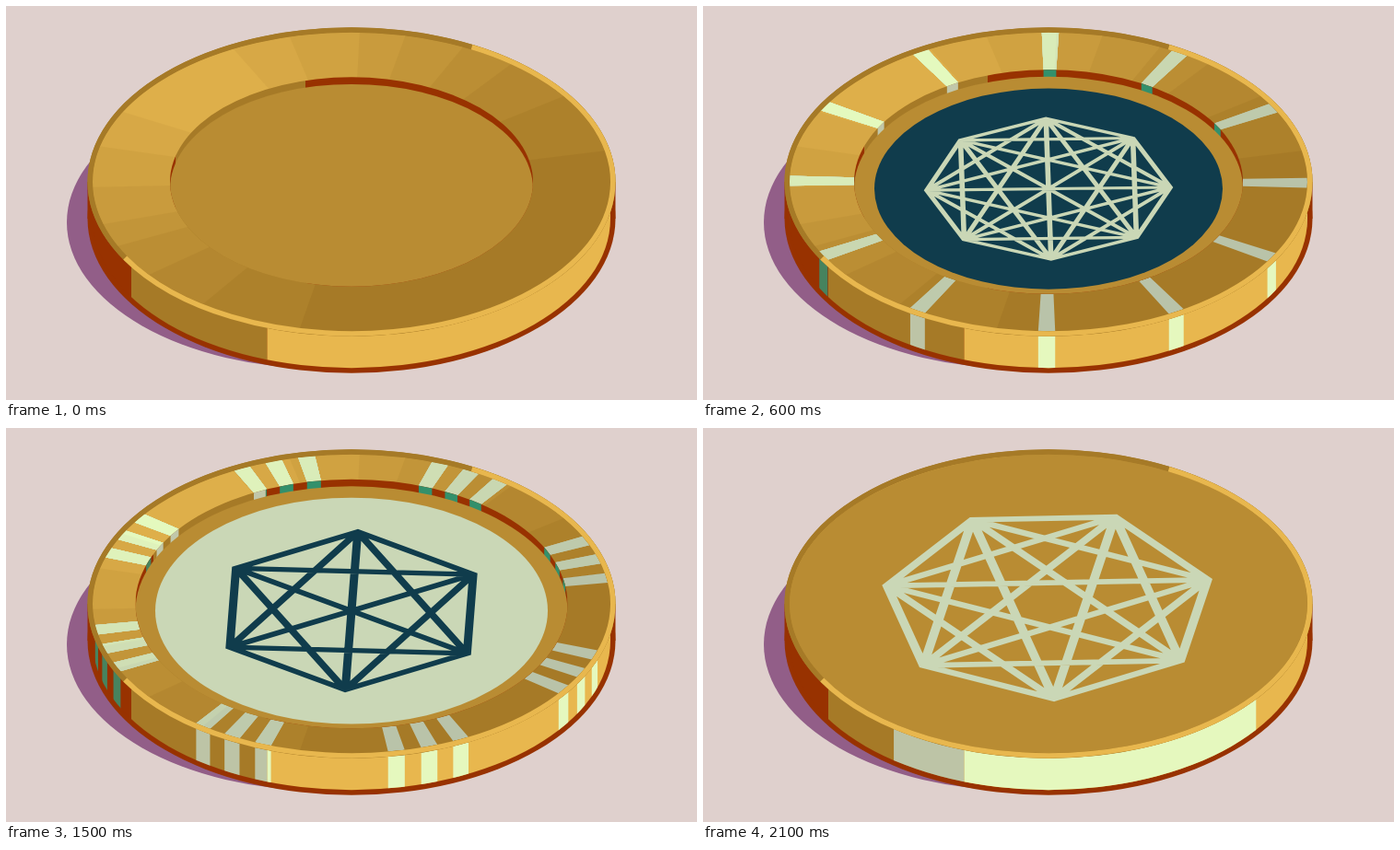
Animation, 750 px wide and 428 px high, one loop 2400 ms. Source, as an HTML page with a canvas:

```html
<!DOCTYPE html>
<html lang="en">
<head>
<meta charset="utf-8">
<title>Coin</title>
<style>
html, body { margin: 0; width: 100%; height: 100%; overflow: hidden; background: #dfd0cd; }
canvas { display: block; width: 750px; height: 428px; }
</style>
</head>
<body>
<canvas id="c" width="750" height="428"></canvas>
<script>
const ctx = document.getElementById('c').getContext('2d');
const STEP = 300, CX = 375, CY = 191, FLOOR = 198.6, TILT = 0.577, R = 281, DEPTH = 40;
const RY = R * TILT, EDGE = 5.5;
const GOLD = '#b98c33', BROWN = '#a67a27', LIGHT = '#e8b74e', RED = '#983200';
const PALE = '#cad7b6', DARK = '#103c4c', BACK = '#dfd0cd', SHADE = '#925e88';
const rad = d => d * Math.PI / 180;

// Facet limits on both sides of the highlight, dark to bright
const FROM = [12, 35, 52, 64.5, 78, 88.2, 103.8, 117.1];
const TO = [258.5, 235, 218.5, 205.5, 196.5, 182, 166.3, 152];
const RING_GOLD = [[166, 122, 39], [222, 175, 74]];
const RING_PALE = [[185, 195, 169], [228, 249, 190]];

// hole: recess radius; inlay: [radius, colour]; star: [points, radius, angle, line, colour]
// marks: [count, centres, width, inner radius]
const COINS = [
  { hole: 197 },
  { hole: 204, inlay: [182, PALE], star: [7, 128, 90, 5.5, DARK], marks: [12, [0], 7.5] },
  { hole: 211, inlay: [189, DARK], star: [8, 132.3, 91.2, 5.6, PALE], marks: [12, [-0.4], 3.75] },
  { hole: 224, inlay: [202.5, PALE], star: [8, 142, 95.5, 6.2, GOLD], marks: [4, [27.9], 45, 263] },
  { hole: 231, inlay: [210, DARK], star: [9, 147.5, 96.9, 6.2, PALE], marks: [8, [21.2], 11.25] },
  { hole: 234.5, inlay: [213, PALE], star: [6, 148.8, 87.4, 9, DARK], marks: [8, [10, 17.5, 25], 3.75] },
  { hole: R, star: [7, 168, 90, 9.5, DARK], marks: [12, [0], 7.5] },
  { hole: R, star: [7, 178.5, 271.9, 10, PALE], marks: [2, [278.3], 90] }
];

function oval(x, y, rx, ry, fill) {
  ctx.beginPath();
  ctx.ellipse(x, y, rx, ry, 0, 0, 7);
  if (fill) { ctx.fillStyle = fill; ctx.fill(); }
}

function rect(x0, x1, y0, y1, fill) {
  if (x1 <= x0) return;
  ctx.fillStyle = fill;
  ctx.fillRect(x0, y0, x1 - x0, y1 - y0);
}

// Draw on the tilted plane, y upwards
function plane(y, draw) {
  ctx.save();
  ctx.transform(1, 0, 0, -TILT, CX, y);
  draw();
  ctx.restore();
}

function spans({ marks }) {
  if (!marks) return [];
  const [n, mids, w] = marks, out = [];
  for (let k = -1; k <= n; k++)
    for (const m of mids) {
      const a = m + k * 360 / n;
      out.push([a - w / 2, a + w / 2]);
    }
  return out;
}

// Horizontal extent of each mark within one half of a circle
function columns(coin, r, lo, hi, paint) {
  for (const [a, b] of spans(coin)) {
    const p = Math.max(a, lo), q = Math.min(b, hi);
    if (p >= q) continue;
    const x = CX + r * Math.cos(rad(p)), y = CX + r * Math.cos(rad(q));
    paint(Math.min(x, y), Math.max(x, y));
  }
}

function bands(x0, x1, cuts, fills, y0, y1) {
  fills.forEach((fill, i) => rect(
    Math.max(x0, i ? cuts[i - 1] : -Infinity),
    Math.min(x1, i < cuts.length ? cuts[i] : Infinity), y0, y1, fill));
}

function ring([dark, bright]) {
  for (let i = 0; i <= 8; i++) {
    const c = dark.map((v, j) => Math.round(v + (bright[j] - v) * i / 8));
    ctx.fillStyle = `rgb(${c})`;
    ctx.beginPath();
    if (i) {
      ctx.moveTo(0, 0);
      ctx.arc(0, 0, R, rad(FROM[i - 1]), rad(TO[i - 1]));
    } else ctx.arc(0, 0, R, 0, 7);
    ctx.fill();
  }
}

function side(coin) {
  const cuts = [136, 283.5];
  oval(CX - 30, 235, 279, 159, SHADE);
  const ox = R + EDGE, oy = RY + EDGE;
  oval(CX, CY + DEPTH, ox, oy, RED);
  rect(CX - ox, CX + ox, CY, CY + DEPTH, RED);
  ctx.save();
  ctx.beginPath();
  ctx.moveTo(CX - R, CY);
  ctx.lineTo(CX + R, CY);
  ctx.ellipse(CX, CY + DEPTH, R, RY, 0, 0, Math.PI);
  ctx.clip();
  bands(CX - R, CX + R, cuts, [RED, BROWN, LIGHT], CY, 400);
  columns(coin, R, 180, 360, (a, b) =>
    bands(a, b, cuts, ['#47835e', '#bdc4a6', '#e5f8be'], CY, 400));
  ctx.restore();
}

function rim(coin) {
  oval(CX, CY, R + EDGE, RY + EDGE, BROWN);
  plane(CY, () => {
    ring(RING_GOLD);
    if (!coin.marks) return;
    const inner = coin.marks[3] || coin.hole;
    ctx.beginPath();
    for (const [a, b] of spans(coin).slice(coin.marks[1].length, -coin.marks[1].length)) {
      ctx.moveTo(R * Math.cos(rad(a)), R * Math.sin(rad(a)));
      ctx.arc(0, 0, R, rad(a), rad(b));
      ctx.arc(0, 0, inner, rad(b), rad(a), true);
      ctx.closePath();
    }
    ctx.clip();
    ring(RING_PALE);
  });
}

function recess(coin) {
  const h = coin.hole, hy = h * TILT;
  if (h === R) return oval(CX, CY, R, RY, GOLD);
  const cuts = [CX - 190.5 - (h - 197) * 0.65, CX - 50 - (h - 197) * 1.15];
  ctx.save();
  oval(CX, CY, h, hy);
  ctx.clip();
  bands(CX - h, CX + h, cuts, [RED, BROWN, RED], 0, 400);
  if (coin.marks && !coin.marks[3])
    columns(coin, h, 0, 180, (a, b) =>
      bands(a, b, cuts, ['#47835e', '#c1c7aa', '#33906b'], 0, FLOOR));
  oval(CX, FLOOR, h, hy, GOLD);
  ctx.restore();
}

function star([n, r, turn, line, color]) {
  const pts = Array.from({ length: n }, (_, i) => {
    const a = rad(turn + i * 360 / n);
    return [r * Math.cos(a), r * Math.sin(a)];
  });
  ctx.strokeStyle = color;
  ctx.lineWidth = line;
  ctx.lineJoin = 'miter';
  ctx.beginPath();
  pts.forEach(p => ctx.lineTo(...p));
  ctx.closePath();
  for (let i = 0; i < n; i++)
    for (let j = i + 2; j < n; j++) {
      ctx.moveTo(...pts[i]);
      ctx.lineTo(...pts[j]);
    }
  ctx.stroke();
}

function border() {
  const arc = (a, b, color) => {
    ctx.beginPath();
    ctx.ellipse(CX, CY, R + EDGE / 2, RY + EDGE / 2, 0, rad(a), rad(b));
    ctx.strokeStyle = color;
    ctx.lineWidth = EDGE;
    ctx.stroke();
  };
  arc(0, 360, BROWN);
  arc(-62.6, 150, LIGHT);
}

function draw(coin) {
  ctx.fillStyle = BACK;
  ctx.fillRect(0, 0, 750, 428);
  side(coin);
  rim(coin);
  recess(coin);
  const base = coin.hole === R ? CY : FLOOR;
  if (coin.inlay) oval(CX, base, coin.inlay[0], coin.inlay[0] * TILT, coin.inlay[1]);
  if (coin.star) plane(base, () => star(coin.star));
  border();
}

const start = performance.now();
function tick() {
  const t = Math.max(0, performance.now() - start);
  draw(COINS[Math.floor(t / STEP) % COINS.length]);
  requestAnimationFrame(tick);
}
tick();
</script>
</body>
</html>
```
